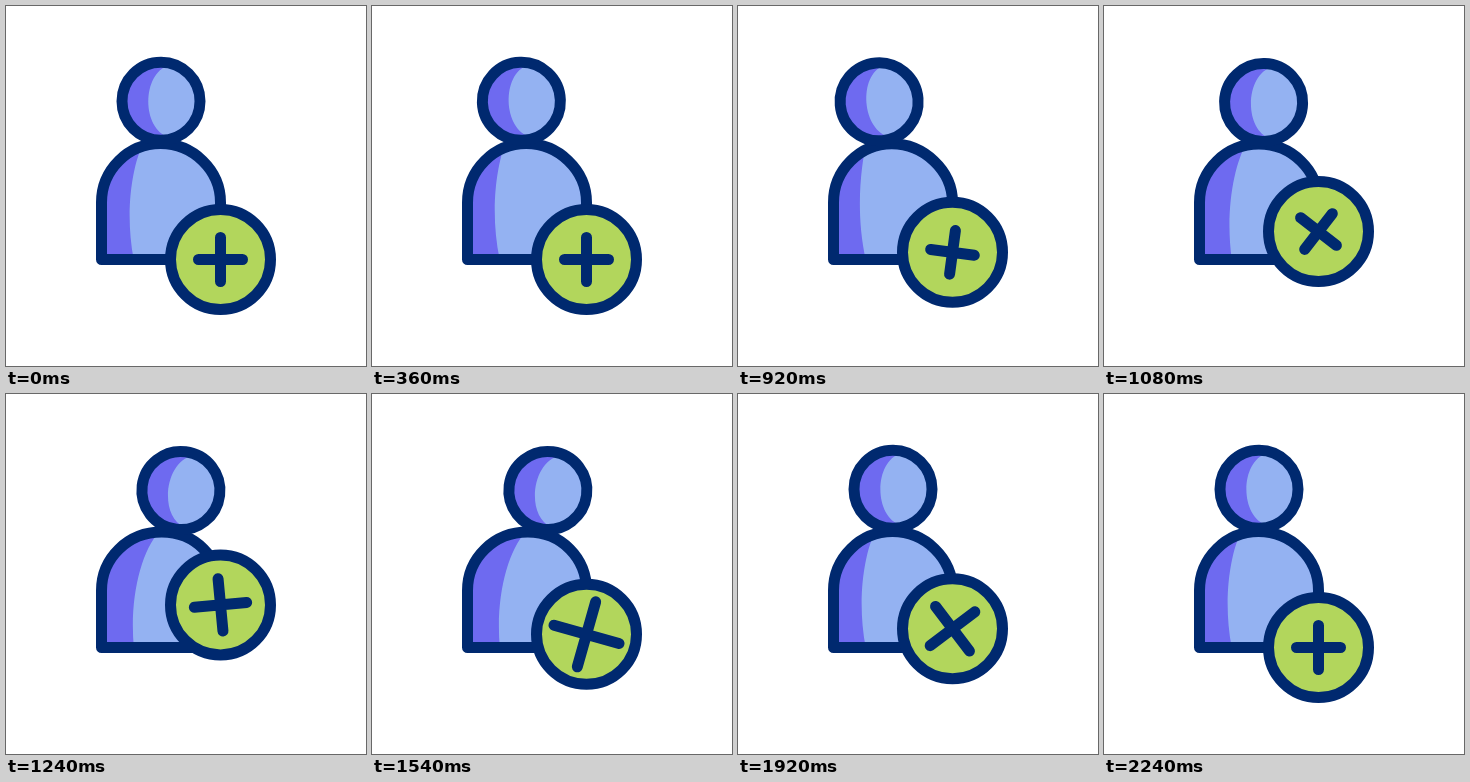
Recreate the animation shown at these times as an HTML page. Size 360x360 px, loop 2.4 s.

```html
<!DOCTYPE html>
<html>
<head>
<meta charset="utf-8">
<style>
  html, body { margin: 0; width: 100%; height: 100%; overflow: hidden; background: #fff; }
  svg { display: block; width: 100vw; height: 100vh; }
  .line { fill: none; stroke: #00296f; stroke-width: 11; stroke-linecap: round; stroke-linejoin: round; }
  .light { fill: #94b2f2; }
  .shade { fill: #6e6af0; }
</style>
</head>
<body>
<svg viewBox="0 0 360 360">
  <clipPath id="torso"><path class="torso"/></clipPath>
  <g clip-path="url(#torso)">
    <path class="torso light"/>
    <path id="fold" class="shade"/>
  </g>
  <path class="torso line"/>
  <g id="head">
    <circle class="light" r="39"/>
    <path class="shade" d="M8-36C-19.5-28-19.5 28 8 36A38 38 0 1 1 8-36Z"/>
    <circle class="line" r="39"/>
  </g>
  <g id="badge">
    <circle class="line" r="50" style="fill:#b2d65c"/>
    <path id="plus" class="line"/>
  </g>
</svg>
<script>
const LOOP = 2400;
const $ = id => document.getElementById(id);
const torsos = document.querySelectorAll('.torso');

// Each track lists [time, value] keys, eased in and out between neighbours.
const tracks = {
  lean: [[200, 0], [660, -20], [800, -20], [1300, 21.5], [1500, 21.5], [1900, 0]],
  dip: [[800, 0], [1080, 1], [1500, 1], [1900, 0]],
  hop: [[800, 0], [1267, 43], [1700, 0], [1950, 19.5], [2220, 0]],
  spin: [[800, 0], [2200, 360]],
  grow: [[1000, 1], [1600, 1.55], [2240, 1]]
};

function at(keys, t) {
  const i = keys.findIndex(k => t < k[0]);
  if (i === 0) return keys[0][1];
  if (i < 0) return keys[keys.length - 1][1];
  const [t0, a] = keys[i - 1], [t1, b] = keys[i];
  const u = (t - t0) / (t1 - t0);
  return a + (b - a) * u * u * (3 - 2 * u);
}

function draw(t) {
  const lean = at(tracks.lean, t);
  const dip = at(tracks.dip, t);
  const peakX = 154.5 + lean * .06, peakY = 137.6 + dip * .5;
  const outline = `M95.5 253.5V196.5C95.5 164 122 ${peakY} ${peakX} ${peakY}S214.5 164 214.5 196.5V253.5Z`;
  torsos.forEach(p => p.setAttribute('d', outline));

  const foldX = (x, follow) => x + lean * follow + dip * 2;
  $('fold').setAttribute('d',
    `M90 130H${foldX(137, .7)}V138C${foldX(127, .3)} 158 ${foldX(118, .15)} 205 128 255H90Z`);

  $('head').setAttribute('transform',
    `translate(${155 + lean} ${95.3 + dip * 1.2}) rotate(${lean * .35})`);
  $('badge').setAttribute('transform', `translate(214.5 ${253.5 - at(tracks.hop, t)})`);

  const arm = 22 * at(tracks.grow, t);
  $('plus').setAttribute('d', `M${-arm} 0H${arm}M0 ${-arm}V${arm}`);
  $('plus').setAttribute('transform', `rotate(${at(tracks.spin, t)})`);
}

const start = performance.now();
function frame() {
  draw((performance.now() - start) % LOOP);
  requestAnimationFrame(frame);
}
frame();
</script>
</body>
</html>
```
